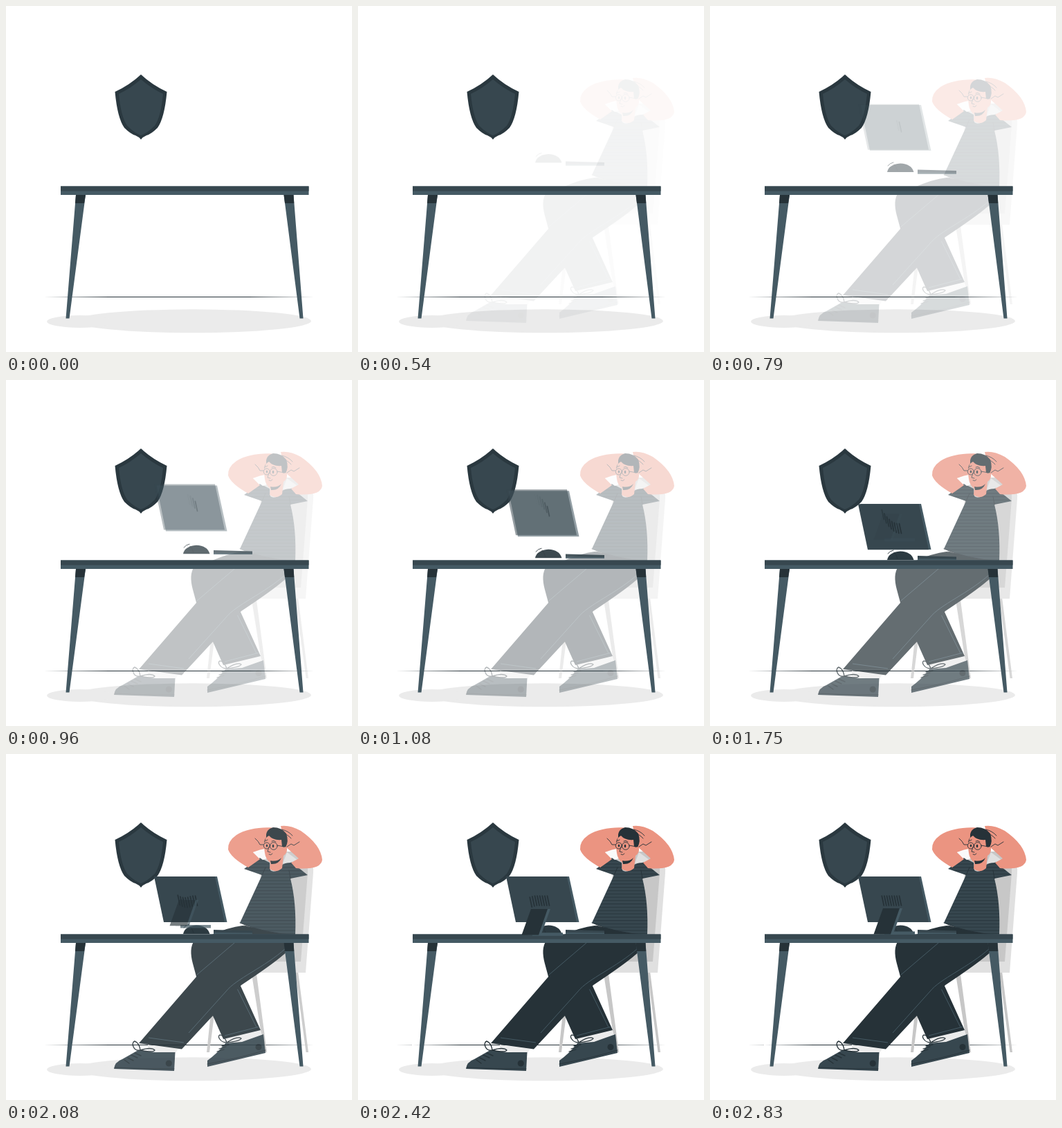
These frames come from a looping animation (500 px wide and 500 px high, 2.93 s). An HTML page:

```html
<!DOCTYPE html>
<html lang="en">
<head>
<meta charset="utf-8">
<title>Man at a desk</title>
<style>
html, body { margin: 0; width: 100%; height: 100%; overflow: hidden; background: #fff; }
svg { display: block; width: 100%; height: 100%; }
.black { fill: #263238; }
.dark { fill: #37474f; }
.mid { fill: #455a64; }
.skin { fill: #eb9481; }
.ink { fill: none; stroke: #263238; stroke-linecap: round; stroke-linejoin: round; }
.seam { fill: none; stroke: #455a64; stroke-width: 1; }
</style>
</head>
<body>
<svg viewBox="0 0 500 500">
  <defs>
    <pattern id="stripes" width="10" height="4.8" patternUnits="userSpaceOnUse">
      <rect width="10" height="4.8" fill="#37474f"/>
      <rect width="10" height="1.2" fill="#2a383f"/>
    </pattern>
  </defs>

  <g fill="#ebebeb">
    <ellipse cx="270" cy="455.3" rx="171" ry="17"/>
    <ellipse cx="107" cy="456" rx="48" ry="9"/>
  </g>
  <path class="black" d="M55 420.5L150 420L350 420L445 420.5L350 420.9L150 420.9Z"/>

  <g id="person" opacity="0">
    <!-- chair -->
    <path fill="#c7c7c7" d="M355 318H362L377 431H373ZM418 314H422L437 431H433.500ZM299 345H305L294 431H290Z"/>
    <path fill="#e0e0e0" d="M372 141H436Q445 150 444 172L433 316H352V290H420Z"/>
    <path fill="#c7c7c7" d="M370 141H424Q437 148 436 172L426 300H360Z"/>

    <!-- far leg and shoe -->
    <path fill="#ebebeb" d="M314 411L367 398L371 408L322 421Z"/>
    <path class="dark" d="M291 452L291 443Q305 433 317 418L341 416L372 405L375 432Z"/>
    <path class="ink" stroke-width=".8" d="M291 448Q335 440 375 428"/>
    <circle class="black" cx="365" cy="423.500" r="4.500"/>
    <path class="ink" stroke-width="1.300" d="M319 417C309 417 304 406 310 406Q316 408 319 417Q334 407 340 411Q338 415 319 417M308 426L318 423M305 430L315 427M312 422L322 420"/>
    <path class="black" d="M272 270Q264 281 270 303L277 329L314 412L368 399L338 333L350 270Z"/>
    <path class="seam" d="M333 337L362 395M316 407L366 394"/>

    <!-- near leg and shoe -->
    <path fill="#ebebeb" d="M205 420L249 426L244 433L205 429Z"/>
    <path class="dark" d="M156 455Q157 445 168 441L191 428L216 431L244.500 431L243 458Z"/>
    <path class="ink" stroke-width=".8" d="M157 453Q200 455 243 455"/>
    <circle class="black" cx="235.300" cy="447" r="4.600"/>
    <path class="ink" stroke-width="1.400" d="M194 428C184 430 180 417 186 415Q193 418 194 428Q210 423 215 428Q213 432 194 428M171 442L178 447M176 439L184 443M181 435L190 439M186 432L195 436"/>
    <path class="black" d="M293 263Q322 250 342 248L418 261L408 283Q400 294 340 334L254 426.500L192 418L275 322L331 271Z"/>
    <path class="seam" d="M330 273L276 319M404 281C374 308 332 325 318 343L264 403M206 410L257 417"/>

    <!-- shirt -->
    <path fill="url(#stripes)" d="M367 150L344 166L370 175L338 244Q370 258 418 262Q420 215 411 180L436 175L411 155L399 160Q390 174 382 168L381 157Z"/>
    <path class="ink" stroke-width=".9" d="M370 175L375 164M411 180L409 168M338 244Q370 258 418 262M344 248Q356 249 357 259"/>

    <!-- arms -->
    <path class="skin" d="M394 108C377 104 348 107 333 117Q320 126 321 138Q325 150 350 164L367 152L357 142Q366 138 379 136Z"/>
    <path fill="#fafafa" d="M357 142L375 138L380 150L371 153Z"/>
    <path fill="#e0e0e0" d="M400 158L406 142L421 153L411 157Z"/>
    <path class="skin" d="M397 104Q410 102 426 111Q455 131 457 153Q455 168 419 165L412 157L423 151L404 134Z"/>

    <!-- head -->
    <path class="skin" d="M377 115Q371 128 374 143Q375 152 382 157L381 166Q390 173 399 165L401 147Q407 143 406 136L402 117Z"/>
    <path class="black" d="M382 154Q392 156 398 150Q394 160 383 159Z"/>
    <path class="black" d="M376 120Q375 109 386 106Q398 106 405 115Q409 126 404 135L399 134L398 124Q386 125 380 118Q373 121 373 130Z"/>
    <path class="skin" d="M399 137Q403 132 406 136Q406 143 400 144Z"/>
    <g class="ink" stroke-width=".9">
      <circle cx="376.800" cy="132.500" r="4.500"/>
      <circle cx="386.800" cy="133" r="5.300"/>
      <path d="M392 132L402 134M381 132L382 132M380 134L378 141L382 142M380 145Q383 147 385 144M374 126L378 124M384 126Q387 124 390 127"/>
      <path d="M360 122Q365 126 367 131L372 131M406 134L412 130L416 132L424 127M398 109Q408 111 414 118M400 114Q408 117 412 122"/>
    </g>
    <ellipse class="black" cx="377" cy="132.500" rx="1.200" ry="2"/>
    <ellipse class="black" cx="386" cy="133" rx="1.300" ry="2.200"/>
  </g>

  <!-- table -->
  <path class="mid" d="M101 273H115L91.500 451.500H86.500ZM401.500 273H415.500L429.500 451.500H424.500Z"/>
  <path class="black" d="M101 273H115L113 285H100ZM401.500 273H415.500L416.200 285H403Z"/>
  <path class="mid" d="M79 260.500H437.500V273H79Z"/>
  <path class="dark" d="M79 260.500H437.500V267.500H79Z"/>

  <!-- shield -->
  <path fill="#2a383f" d="M195 99Q211 114 232.500 124Q229 162 219 176Q210 185 203 187Q198 189 195 193Q192 189 187 187Q180 185 171 176Q161 162 157.500 124Q179 114 195 99Z"/>
  <path class="dark" d="M195 106Q210 119 227 127Q224 160 215 173Q205 183 195 187Q185 183 175 173Q166 160 163 127Q180 119 195 106Z"/>

  <g id="keyboard" opacity="0">
    <path class="dark" d="M300 254L356 255.500V260L300 260Z"/>
    <path class="mid" d="M300 258L356 258.500V260H300Z"/>
  </g>
  <g id="mouse" opacity="0">
    <path fill="#2c3a41" d="M256 260Q258 249 275 247.500Q291 248 294.500 260Z"/>
    <path class="ink" stroke-width=".9" d="M257 251Q260 247 265 246M266 249Q269 252 271 258"/>
  </g>
  <path id="back" class="mid" opacity="0" d="M217.500 177H305L319.500 243H231Z"/>
  <path id="front" class="dark" opacity="0" d="M214 177H302L316 243H228Z"/>
  <g id="vents"></g>
  <path id="base" class="mid" opacity="0" d="M252 256.500H296V261H252Z"/>
  <g id="stand" opacity="0">
    <path class="mid" d="M258 223H278L264.500 260.500H245Z"/>
    <path class="black" d="M250 223H274L261 260.500H236.500Z"/>
  </g>
</svg>
<script>
const LOOP = 2930;
const $ = id => document.getElementById(id);

const curve = (s, a, b) => 3 * (1 - s) ** 2 * s * a + 3 * (1 - s) * s * s * b + s ** 3;

// cubic-bezier(.36, -.01, .5, 1.38): settles with a small overshoot
function ease(x) {
  if (x <= 0) return 0;
  if (x >= 1) return 1;
  let lo = 0, hi = 1;
  for (let i = 0; i < 20; i++) {
    const mid = (lo + hi) / 2;
    if (curve(mid, .36, .5) < x) lo = mid; else hi = mid;
  }
  return curve(lo, -.01, 1.38);
}

const drops = [
  { el: $('keyboard'), start: 365, span: 1180, rise: 32 },
  { el: $('mouse'), start: 380, span: 1150, rise: 36 },
  { el: $('back'), start: 515, span: 1350, rise: 40 },
  { el: $('front'), start: 545, span: 1350, rise: 40 },
  { el: $('base'), start: 1500, span: 1200, rise: 33 },
  { el: $('stand'), start: 1550, span: 1200, rise: 33 }
];

// vent slots fall one after another, from right to left
for (let i = 0; i < 8; i++) {
  const slot = document.createElementNS('http://www.w3.org/2000/svg', 'path');
  slot.setAttribute('d', `M${273.5 - i * 3.6} 205l3 14`);
  slot.setAttribute('class', 'ink');
  slot.setAttribute('stroke-width', 1.7);
  $('vents').append(slot);
  drops.push({ el: slot, start: 600 + i * 85, span: 1350, rise: 40 });
}

function draw(now) {
  const t = now % LOOP;
  $('person').setAttribute('opacity', Math.max(0, Math.min(1, (t - 435) / 1850)));
  for (const { el, start, span, rise } of drops) {
    const e = ease((t - start) / span);
    el.setAttribute('opacity', Math.max(0, Math.min(1, e)));
    el.setAttribute('transform', `translate(0 ${rise * (e - 1)})`);
  }
}

const begin = performance.now();
function tick() {
  draw(performance.now() - begin);
  requestAnimationFrame(tick);
}
tick();
</script>
</body>
</html>
```
